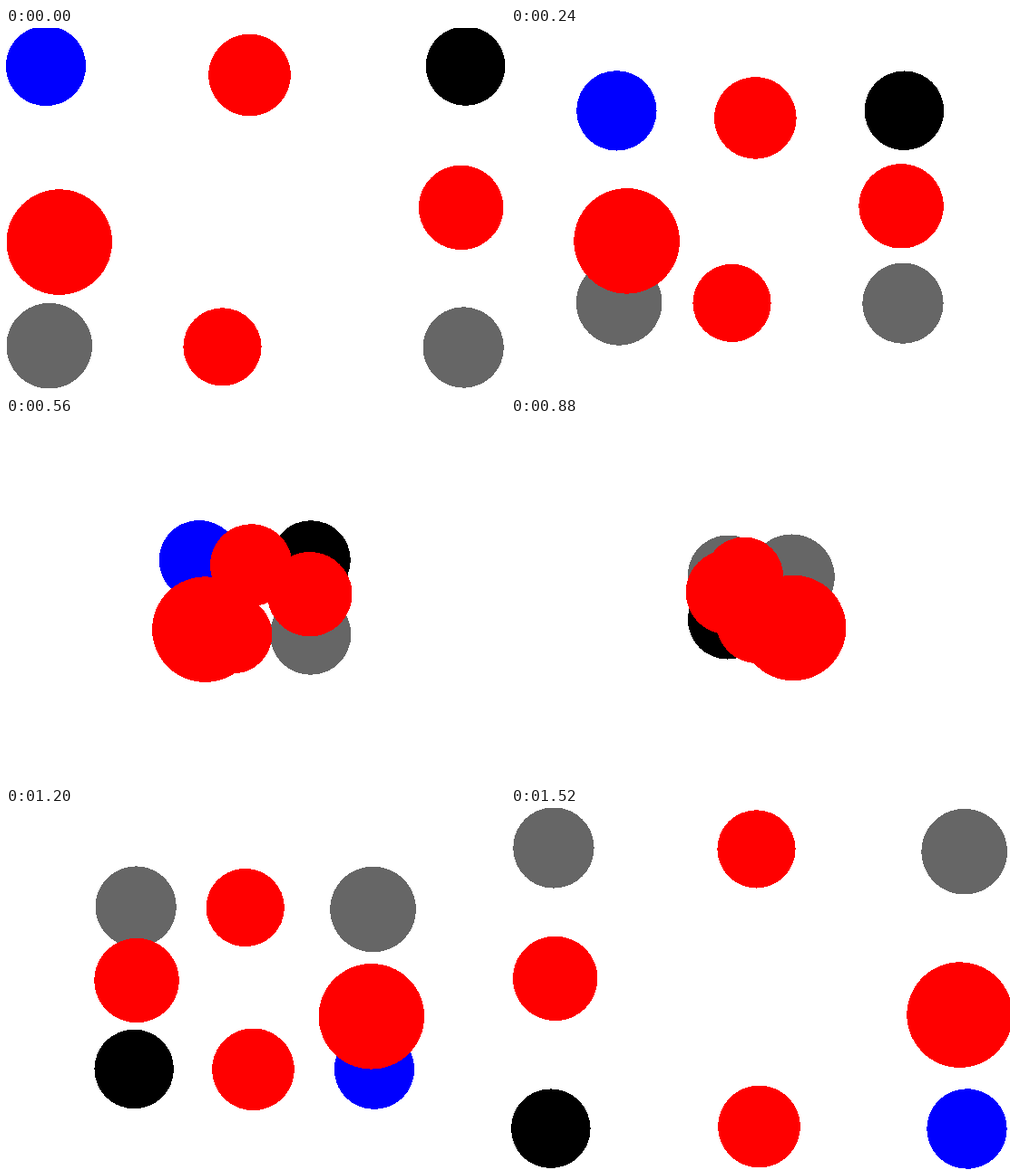
Recreate the animation shown at these times as an HTML page. Size 550 px wide and 400 px high, loop 1.6 s.

```html
<!DOCTYPE html>
<html lang="en">
<head>
<meta charset="utf-8">
<title>Crossing circles</title>
<style>
html, body { margin: 0; width: 100%; height: 100%; overflow: hidden; background: #fff; }
svg { display: block; }
</style>
</head>
<body>
<svg id="stage" width="550" height="400" shape-rendering="crispEdges"></svg>
<script>
const STEP = 80, STEPS = 20;
const stage = document.getElementById('stage');

// colour, radius, start x, y, end x, y
const circles = [
  ['#00f', 44.2, 44, 42, 502.5, 354.5],
  ['#000', 43.8, 506.5, 42, 43.8, 354.2],
  ['#666', 47.3, 47.8, 351.2, 499.7, 48.2],
  ['#666', 44.6, 504.2, 353, 47, 44],
  ['#f00', 45.3, 268.5, 52, 273.5, 352],
  ['#f00', 46.7, 501.6, 198.4, 48.7, 188.4],
  ['#f00', 58.3, 58.8, 236.6, 494.6, 228.6],
  ['#f00', 43.1, 238.5, 352.4, 270.5, 45.4],
].map(([fill, r, ...path]) => {
  const node = document.createElementNS('http://www.w3.org/2000/svg', 'circle');
  node.setAttribute('fill', fill);
  node.setAttribute('r', r);
  stage.append(node);
  return { node, path };
});

function draw(time) {
  const progress = Math.floor(time / STEP) % STEPS / (STEPS - 1);
  for (const { node, path: [x0, y0, x1, y1] } of circles) {
    node.setAttribute('cx', x0 + (x1 - x0) * progress);
    node.setAttribute('cy', y0 + (y1 - y0) * progress);
  }
}

const start = performance.now();
function tick() {
  draw(performance.now() - start);
  requestAnimationFrame(tick);
}
tick();
</script>
</body>
</html>
```
